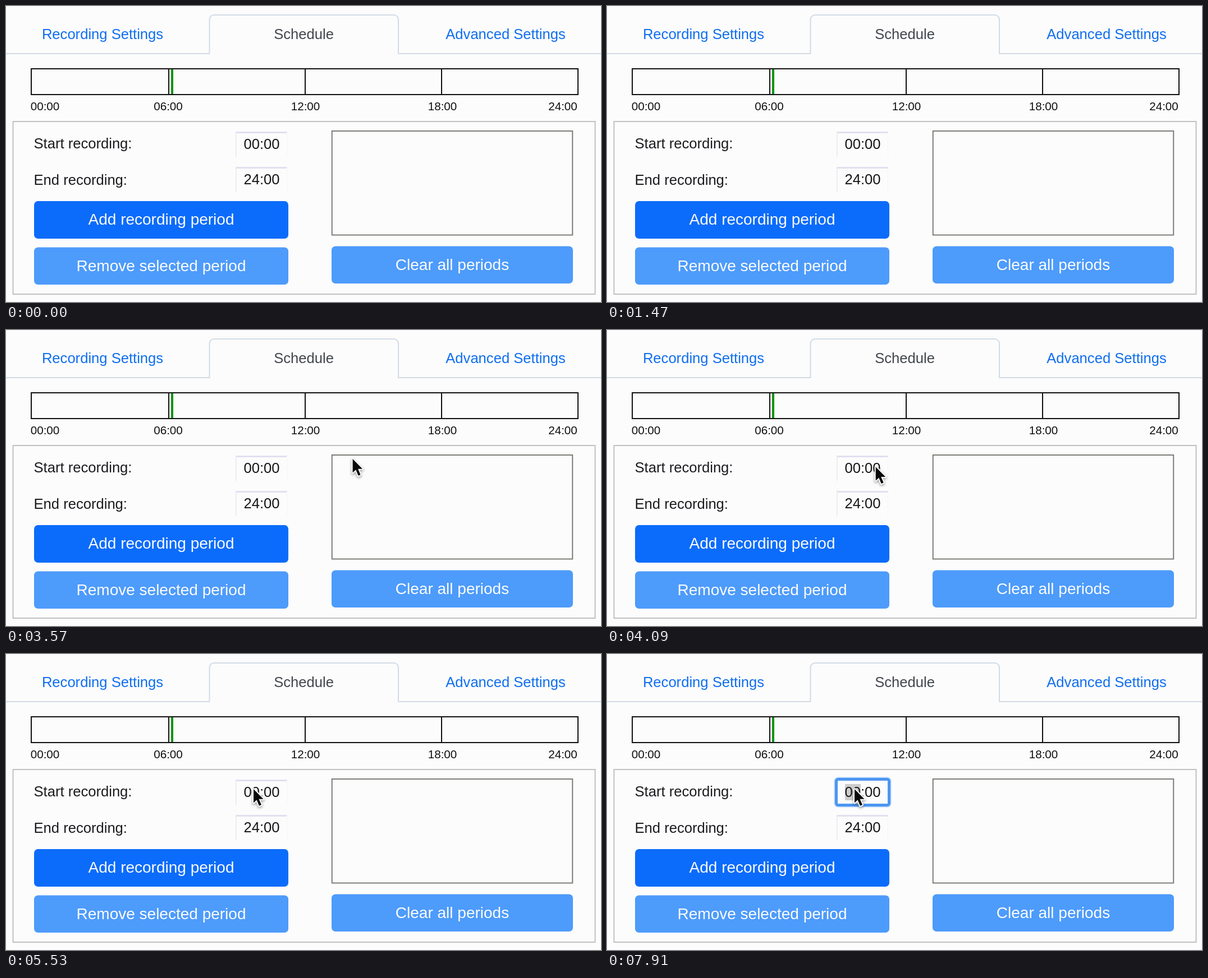
Write an HTML page with a canvas that moves like this. It is 1060 by 528 pixels and loops after 8 s.

```html
<!DOCTYPE html>
<html lang="en">
<head>
<meta charset="utf-8">
<title>Recording schedule</title>
<style>
html, body { margin: 0; width: 100%; height: 100%; overflow: hidden; background: #fcfcfc; }
canvas { display: block; }
</style>
</head>
<body>
<canvas id="stage" width="1060" height="528"></canvas>
<script>
const ctx = document.getElementById('stage').getContext('2d');
const LOOP = 8000;
const FOCUS_AT = 6650;
const ENTER_AT = 3070;

// Pointer tip: time, x, y
const path = [
  [ENTER_AT, 1056, 206], [3290, 905, 215], [3570, 617, 229],
  [3850, 505, 240], [4150, 471, 244], [4850, 471, 244], [5250, 440, 240]
];

function label(str, x, y, size, color, align = 'left') {
  ctx.font = `${size}px "Liberation Sans", Arial, sans-serif`;
  ctx.textAlign = align;
  ctx.fillStyle = color;
  ctx.fillText(str, x, y);
}

function frame(x, y, w, h, color, width) {
  ctx.strokeStyle = color;
  ctx.lineWidth = width;
  ctx.strokeRect(x, y, w, h);
}

function rounded(x, y, w, h, r) {
  ctx.beginPath();
  ctx.roundRect(x, y, w, h, r);
}

function button(str, x, y, w, h, color) {
  rounded(x, y, w, h, 7);
  ctx.fillStyle = color;
  ctx.fill();
  label(str, x + w / 2, y + 42, 28, '#fcfcfc', 'center');
}

function tabs() {
  ctx.beginPath();
  ctx.moveTo(0, 85);
  ctx.lineTo(362.5, 85);
  ctx.lineTo(362.5, 24);
  ctx.arcTo(362.5, 16, 370.5, 16, 8);
  ctx.lineTo(691, 16);
  ctx.arcTo(699, 16, 699, 24, 8);
  ctx.lineTo(699, 85);
  ctx.lineTo(1060, 85);
  ctx.strokeStyle = '#d2dbe6';
  ctx.lineWidth = 2;
  ctx.stroke();
  label('Recording Settings', 172, 59, 25.6, '#0f6ef0', 'center');
  label('Schedule', 530.5, 59, 25.6, '#42464c', 'center');
  label('Advanced Settings', 890, 59, 25.6, '#0f6ef0', 'center');
}

function timeline() {
  frame(45, 112, 974, 46, '#101010', 2);
  ctx.fillStyle = '#101010';
  for (const x of [289, 532, 775]) ctx.fillRect(x, 112, 2, 46);
  ctx.fillStyle = '#0d960d';
  ctx.fillRect(294, 113, 4, 44);
  ['00:00', '06:00', '12:00', '18:00', '24:00'].forEach((s, i) =>
    label(s, [69.5, 289, 533.5, 777.5, 992][i], 186, 20.6, '#101010', 'center'));
}

function timeField(str, y, focused) {
  if (focused) {
    rounded(404.5, y - 5.5, 102, 54, 7);
    ctx.fillStyle = '#b9d6fb';
    ctx.fill();
    rounded(406, y - 4, 99, 51, 6);
    ctx.fillStyle = '#4b96f2';
    ctx.fill();
    ctx.fillStyle = '#fcfcfc';
    ctx.fillRect(411, y + 1, 89, 41);
    ctx.fillStyle = '#cdcdcd';
    ctx.fillRect(424, y + 7, 28, 29);
  } else {
    ctx.fillStyle = '#e0e0f0';
    ctx.fillRect(409, y - 1, 92, 3);
    ctx.fillStyle = '#e8e8f0';
    ctx.fillRect(409, y, 1.5, 44);
    ctx.fillStyle = '#f5f5f8';
    ctx.fillRect(500, y, 1, 44);
  }
  label(str, 455.5, y + 30, 25.6, '#161616', 'center');
}

function pointerAt(t) {
  for (let i = 1; i < path.length; i++) {
    const [t0, x0, y0] = path[i - 1], [t1, x1, y1] = path[i];
    if (t < t1) {
      const k = (t - t0) / (t1 - t0);
      return [x0 + (x1 - x0) * k, y0 + (y1 - y0) * k];
    }
  }
  return path[path.length - 1].slice(1);
}

function pointer(x, y) {
  const arrow = new Path2D('M1 1V25.5L6.6 20.2L11 30.8L15 29.1L10.5 18.7H18.5Z');
  ctx.save();
  ctx.translate(x, y);
  ctx.lineJoin = 'round';
  ctx.lineWidth = 4;
  ctx.strokeStyle = '#fcfcfc';
  ctx.shadowColor = 'rgba(0,0,0,0.4)';
  ctx.shadowBlur = 4;
  ctx.shadowOffsetY = 2;
  ctx.stroke(arrow);
  ctx.shadowColor = 'transparent';
  ctx.fillStyle = '#080808';
  ctx.fill(arrow);
  ctx.restore();
}

function draw(t) {
  ctx.fillStyle = '#fcfcfc';
  ctx.fillRect(0, 0, 1060, 528);
  tabs();
  timeline();
  frame(12.5, 206, 1037, 308, '#bfc2bd', 2);
  frame(580.75, 223, 428.5, 185.5, '#7c7c78', 2);
  label('Start recording:', 49.5, 254, 25.6, '#1c1c20');
  label('End recording:', 49.5, 319, 25.6, '#1c1c20');
  timeField('00:00', 225, t >= FOCUS_AT);
  timeField('24:00', 288, false);
  button('Add recording period', 50, 348, 453, 67, '#0b6cfb');
  button('Remove selected period', 50, 430.5, 453, 66.5, '#4d9bfb');
  button('Clear all periods', 580, 428.5, 430, 66.5, '#4d9bfb');
  if (t >= ENTER_AT) pointer(...pointerAt(t));
}

const start = performance.now();
function tick() {
  draw((performance.now() - start) % LOOP);
  requestAnimationFrame(tick);
}
tick();
</script>
</body>
</html>
```
